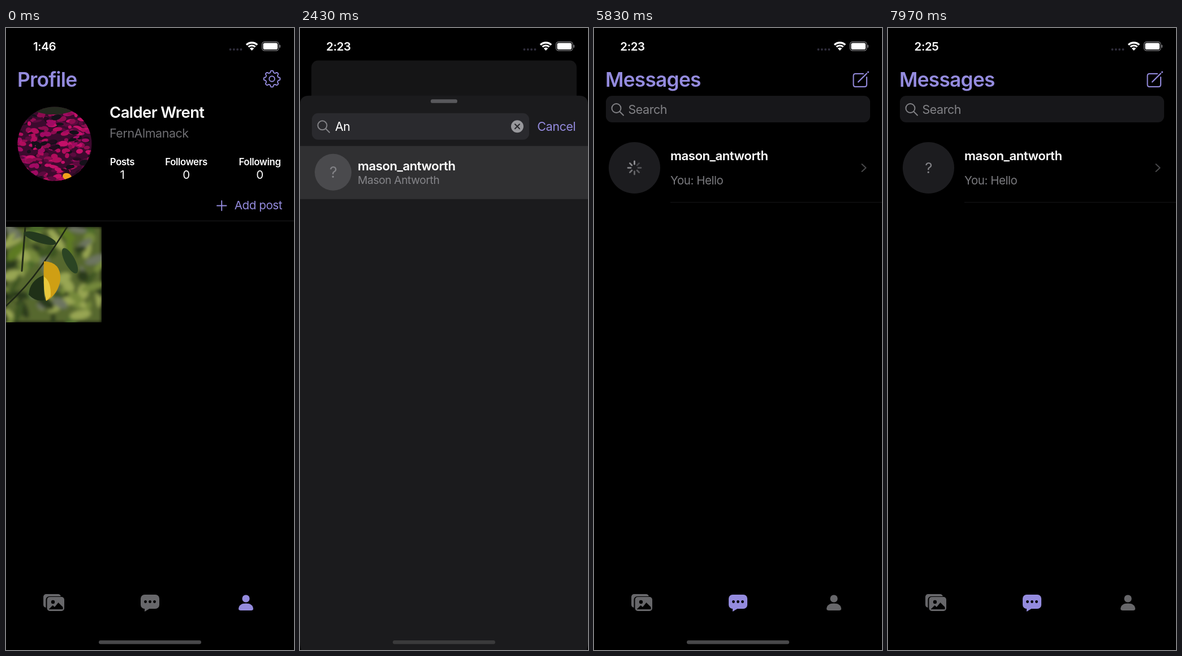
Animation of 509 by 1101 pixels, one loop 8 s. Source, as an HTML page:

```html
<!DOCTYPE html>
<html lang="en">
<head>
<meta charset="utf-8">
<title>Messenger demo</title>
<style>
  html, body { margin: 0; height: 100%; overflow: hidden; background: #000; }
  svg { display: block; width: 100vw; height: 100vh; }
  text { font-family: Inter, "Liberation Sans", sans-serif; letter-spacing: -.022em; white-space: pre; }
</style>
</head>
<body>
<svg id="stage" viewBox="0 0 509 1101"></svg>
<script>
const W = 509, H = 1101, LOOP = 8000;
const PURPLE = '#948bde', GRAY = '#828286', WHITE = '#fff', TAB = '#67676a';
const USER = 'mason_antworth', FULL = 'Mason Antworth';

// ---- helpers ----
const clamp = v => Math.min(1, Math.max(0, v));
const span = (t, start, length) => clamp((t - start) / length);
const easeOut = p => 1 - (1 - p) ** 3;
const smooth = p => p * p * (3 - 2 * p);

// y is the middle of the capital letters
const text = (x, y, s, size, color, weight = 400, anchor = 'start') =>
  `<text x="${x}" y="${y + size * .36}" font-size="${size}" fill="${color}" font-weight="${weight}" text-anchor="${anchor}">${s}</text>`;
const rect = (x, y, w, h, r, fill, extra = '') =>
  `<rect x="${x}" y="${y}" width="${w}" height="${h}" rx="${r}" fill="${fill}" ${extra}/>`;
const circle = (x, y, r, fill) => `<circle cx="${x}" cy="${y}" r="${r}" fill="${fill}"/>`;
const ellipse = (x, y, rx, ry, turn, fill) =>
  `<ellipse rx="${rx}" ry="${ry}" fill="${fill}" transform="translate(${x} ${y}) rotate(${turn})"/>`;
const line = (d, color, width) =>
  `<path d="${d}" fill="none" stroke="${color}" stroke-width="${width}" stroke-linecap="round" stroke-linejoin="round"/>`;
const shape = (d, fill) => `<path d="${d}" fill="${fill}"/>`;
const move = (x, y, body, scale = 1) =>
  `<g transform="translate(${x} ${y}) scale(${scale})">${body}</g>`;

function random(seed) {
  return () => (seed = (seed * 16807) % 2147483647) / 2147483647;
}

// ---- photos ----
function flowerPhoto() {
  const rnd = random(77);
  const tones = ['#b00d5c', '#c41068', '#8e0c50', '#a00a62', '#5c0a3e', '#260a20', '#15101a'];
  let s = rect(20, 139, 132, 132, 0, '#3c0a2e');
  for (let i = 0; i < 260; i++) {
    const x = 20 + rnd() * 132, y = 150 + rnd() * 120;
    s += ellipse(x, y, 3 + rnd() * 6, 2 + rnd() * 3, rnd() * 40 - 20, tones[rnd() * tones.length | 0]);
  }
  s += ellipse(84, 142, 36, 11, 0, '#24291f') + ellipse(108, 263, 8, 6, 20, '#f0a01c');
  return `<clipPath id="round"><circle cx="86" cy="205" r="65.5"/></clipPath><g clip-path="url(#round)">${s}</g>`;
}

function leafPhoto() {
  const rnd = random(4021);
  const tones = ['#5d7a24', '#75893a', '#3c5420', '#98a652', '#2b3b1b', '#6d7560', '#4c6a2c'];
  let s = rect(0, 352, 169, 169, 0, '#56672f');
  for (let i = 0; i < 75; i++)
    s += ellipse(rnd() * 169, 352 + rnd() * 169, 9 + rnd() * 14, 4 + rnd() * 7, rnd() * 180, tones[rnd() * 7 | 0]);
  s = `<filter id="soft"><feGaussianBlur stdDeviation="3"/></filter><g filter="url(#soft)">${s}</g>`;
  s += line('M108 352Q88 385 62 422T0 492', '#1e2616', 2.5) + line('M34 352L28 430', '#222b18', 3);
  s += ellipse(60, 372, 30, 8, 18, '#24391e') + ellipse(113, 412, 9, 25, -28, '#2b4423');
  s += shape('M66 438Q42 447 40 472Q52 485 68 482Z', '#1f3017');
  s += shape('M67 413Q98 414 96 446Q92 472 71 483Q65 450 67 413Z', '#cf9f14');
  s += shape('M67 440Q80 448 79 475L71 483Q66 462 67 440Z', '#e9c93c');
  return `<clipPath id="post"><rect y="352" width="169" height="169"/></clipPath><g clip-path="url(#post)">${s}</g>`;
}

// ---- icons ----
function gear(x, y) {
  let d = '';
  for (let i = 0; i < 160; i++) {
    const a = i / 160 * 2 * Math.PI, r = 12.8 + 1.7 * Math.tanh(2 * Math.cos(8 * a));
    d += (i ? 'L' : 'M') + (x + r * Math.sin(a)).toFixed(2) + ' ' + (y - r * Math.cos(a)).toFixed(2);
  }
  return line(d + 'Z', PURPLE, 1.9) +
    `<circle cx="${x}" cy="${y}" r="4.8" fill="none" stroke="${PURPLE}" stroke-width="1.9"/>`;
}

const compose = line('M476 81H462Q458.500 81 458.500 85V100Q458.500 104 462 104H478Q482 104 482 100V87', PURPLE, 2) +
  line('M467 95.500L482 80.500', PURPLE, 2.2) + circle(484.5, 78, 1.6, PURPLE);

const magnifier = (x, y) =>
  `<circle cx="${x - 2}" cy="${y - 2}" r="8" fill="none" stroke="${GRAY}" stroke-width="2"/>` +
  line(`M${x + 4} ${y + 4}L${x + 10.5} ${y + 10.5}`, GRAY, 2);

function spinner(x, y, t) {
  let s = '';
  const lead = Math.floor(t / 40) % 8;
  for (let i = 0; i < 8; i++) {
    const fade = ((i - lead + 8) % 8) / 7;
    s += `<path d="M0-6.500V-11.500" stroke="#a0a0a4" stroke-opacity="${.3 + .6 * fade}" stroke-width="2.8" stroke-linecap="round" transform="translate(${x} ${y}) rotate(${i * 45})"/>`;
  }
  return s;
}

function avatar(x, y, r, fill, t, loading) {
  return circle(x, y, r, fill) +
    (loading ? spinner(x, y, t) : text(x, y, '?', r > 40 ? 26 : 27, GRAY, 400, 'middle'));
}

function statusBar(time) {
  let s = text(68, 32.5, time, 20.5, WHITE, 600, 'middle');
  for (let i = 0; i < 4; i++) s += circle(396.5 + i * 6.3, 38, 2, '#302e3c');
  const arc = (r, w) =>
    `<path d="M${434.5 - r * .7} ${39.5 - r * .7}A${r} ${r} 0 0 1 ${434.5 + r * .7} ${39.5 - r * .7}" fill="none" stroke="#fff" stroke-width="${w}"/>`;
  s += arc(13.7, 3.3) + arc(8.6, 3.2) + shape('M434.500 40L430.700 36Q434.500 32.800 438.300 36Z', WHITE);
  s += rect(452.5, 24.5, 29.5, 15.5, 4.5, 'none', 'stroke="#77777a" stroke-width="1.3"');
  return s + rect(454.5, 26.5, 25.5, 11.5, 2.8, WHITE) + rect(483.3, 29.8, 1.8, 5, .9, '#77777a');
}

function tabBar(active) {
  const tone = i => i === active ? PURPLE : TAB;
  const dots = [246.5, 254.5, 262.5].map(x => circle(x, 1015.5, 2.4, '#000')).join('');
  return rect(66, 1002, 31, 24, 5, tone(0)) + rect(70.5, 1006, 34, 28, 6, '#000') + rect(72.5, 1007, 30.5, 25, 5, tone(0)) +
    circle(83, 1016, 3.2, '#000') + shape('M75.500 1029L82.500 1022L86 1025L92.500 1017L100.500 1025V1029Z', '#000') +
    rect(238, 1003, 33, 25, 7, tone(1)) + shape('M245 1026V1033L255 1027Z', tone(1)) + dots +
    circle(424, 1010, 6.6, tone(2)) + shape('M411 1028Q412 1018.500 424 1018.500T437 1028Q437 1031 433 1031H415Q411 1031 411 1028Z', tone(2));
}

const homeBar = color => rect(164, 1084, 181, 6.5, 3.2, color);

// ---- screens ----
const photos = flowerPhoto() + leafPhoto();

function profile() {
  const stats = [['Posts', 205.5, 1], ['Followers', 318.5, 0], ['Following', 448.5, 0]];
  return text(20, 91, 'Profile', 35.3, PURPLE, 600) + gear(470, 90) + photos +
    text(183, 149, 'Calder Wrent', 27.5, WHITE, 600) + text(183, 186, 'FernAlmanack', 21.5, '#6e6e72') +
    stats.map(([name, x, n]) => text(x, 237, name, 16.8, WHITE, 600, 'middle') + text(x, 260, n, 20.5, WHITE, 400, 'middle')).join('') +
    line('M373 314.500H389.500M381.200 306V323', PURPLE, 1.9) + text(488, 314, 'Add post', 20.6, PURPLE, 400, 'end') +
    rect(0, 341, W, 1, 0, '#1b1b1d') + tabBar(2) + homeBar('#48484a');
}

function messages(t, hasRow, fill = '#000') {
  let s = rect(0, 0, W, H, 0, fill) + text(20, 91, 'Messages', 35.3, PURPLE, 600) + compose +
    rect(21, 120, 467, 47, 11, '#17171a') + magnifier(41.5, 144) + text(60.5, 144, 'Search', 21.5, GRAY);
  if (hasRow)
    s += avatar(71.5, 247.5, 45.5, '#1c1c1f', t, t < 7930) +
      text(135, 226, USER, 22.2, WHITE, 600) + text(135, 270, 'You: Hello', 20.5, '#7a7a7e') +
      line('M473.500 241L480.500 247.500L473.500 254', '#48484a', 2) + rect(135, 308, 374, 1, 0, '#161618');
  return s + tabBar(1);
}

function chat(t) {
  const typed = Math.floor(clamp((t - 3330) / 600) * 5), sent = t >= 4200;
  const draft = sent ? '' : 'Hello'.slice(0, typed);
  const caretX = 38 + [0, 15.5, 27.5, 32.5, 37.5, 50][draft.length];
  return rect(0, 0, W, H, 0, '#000') + line('M25 79.500L13.500 90L25 100.500', PURPLE, 3) +
    text(38, 90, 'Back', 21.5, PURPLE) + text(254.5, 90.5, USER, 22.2, PURPLE, 600, 'middle') +
    (sent ? rect(411, 119, 77, 42, 19, '#45298a') + text(424, 140, 'Hello', 21.5, WHITE) : '') +
    rect(0, 996, W, 105, 0, '#171719') + rect(21, 1004.5, 467, 44.5, 22.2, '#141416', 'stroke="#4a4a4e" stroke-width="1.2"') +
    text(38, 1026, draft || 'Message', 21.5, draft ? WHITE : '#525258') +
    (t > 3130 ? rect(caretX - 1.3, 1013, 2.6, 27, 1.3, PURPLE) : '') +
    circle(466.5, 1026.5, 18, draft ? PURPLE : '#626266') +
    line('M466.500 1035V1019M459.500 1025.500L466.500 1018.500L473.500 1025.500', '#171719', 2.6);
}

function person(y, t, loading, fill) {
  return avatar(58.5, y, 32.5, fill, t, loading) +
    text(102, y - 11, USER, 22.2, WHITE, 600) + text(102, y + 13.5, FULL, 19.3, '#858589');
}

// new message sheet, drawn from its own top edge
function sheet(t) {
  const focus = t < 5000 ? smooth(span(t, 950, 200)) : 0;
  const query = 'An'.slice(0, t < 5000 ? (t > 1350) + (t > 1500) : 0);
  const y = 95 - 64 * focus, mid = y + 23.5;
  let s = shape(`M0 16Q0 0 16 0H493Q509 0 509 16V${H - 135}A61 61 0 0 1 448 ${H - 74}H61A61 61 0 0 1 0 ${H - 135}Z`, '#1b1b1d') +
    rect(231, 6.5, 47, 6.5, 3.2, '#58585c') +
    `<g opacity="${1 - focus}">${text(254.5, 57.5 - 20 * focus, 'New message', 21.7, PURPLE, 600, 'middle')}</g>` +
    rect(21, y, 467 - 83 * focus, 47, 11, '#2a2a2e') + magnifier(41.5, mid) +
    text(query ? 62 : 60.5, mid, query || 'Search', 21.5, query ? WHITE : '#929296');
  if (focus) {
    s += `<g opacity="${focus}">${text(487 + 80 * (1 - focus), mid, 'Cancel', 21.5, PURPLE, 400, 'end')}</g>`;
    if (t < 2300) s += rect(62 + [0, 14.5, 27][query.length], mid - 13, 2.6, 26, 1.3, PURPLE);
  }
  if (query)
    s += circle(384, mid, 11, '#98989c') + line(`M380 ${mid - 4}l8 8m0-8l-8 8`, '#2a2a2e', 2);
  if (query && t > 1620) {
    const pressed = t > 2330;
    s += (pressed ? rect(0, 89, W, 94, 0, '#303032') : '') + person(135.5, t, t < 1850, pressed ? '#4a4a4d' : '#3a3a3e');
  }
  if (t > 5000)
    s += text(26.5, 208.5, 'Recents (1)', 19.9, '#858589', 600) + text(482, 208.5, 'Clear all', 21.2, PURPLE, 600, 'end') +
      person(273, t, t < 7100, '#3a3a3e') + rect(26.5, 318.5, 483, 1, 0, '#3a3a3e');
  return s;
}

// ---- timeline ----
function frame(t) {
  if (t < 30) return profile() + statusBar('1:46');

  const hasRow = t > 4200;
  const up = t < 5000 ? easeOut(span(t, 255, 500)) - smooth(span(t, 2380, 400))
                      : easeOut(span(t, 6304, 500)) - smooth(span(t, 7480, 400));
  const push = easeOut(span(t, 2780, 350)) - easeOut(span(t, 4620, 350));
  const bar = (t < 2780 || t >= 5430) && t < 7900;
  let s = '';

  if (up > 0) {
    const tone = Math.round(22 * up);
    s = `<clipPath id="card"><rect width="${W}" height="${H}" rx="${14 * up}"/></clipPath>` +
      move(21 * up, 60 * up, `<g clip-path="url(#card)">${messages(t, hasRow, `rgb(${tone},${tone},${tone + 1})`)}</g>`, 1 - .0825 * up) +
      move(0, 74 + 1027 * (1 - up), sheet(t));
  } else {
    if (push < 1) s += move(-150 * push, 0, messages(t, hasRow));
    if (push > 0) s += move(W * (1 - push), 0, chat(t));
  }
  if (bar) s += homeBar(up > .5 ? '#3a3a3b' : '#48484a');
  return s + statusBar(t < 7930 ? '2:23' : '2:25');
}

const stage = document.getElementById('stage');
const began = performance.now();
function tick() {
  stage.innerHTML = frame((performance.now() - began) % LOOP);
  requestAnimationFrame(tick);
}
tick();
</script>
</body>
</html>
```
